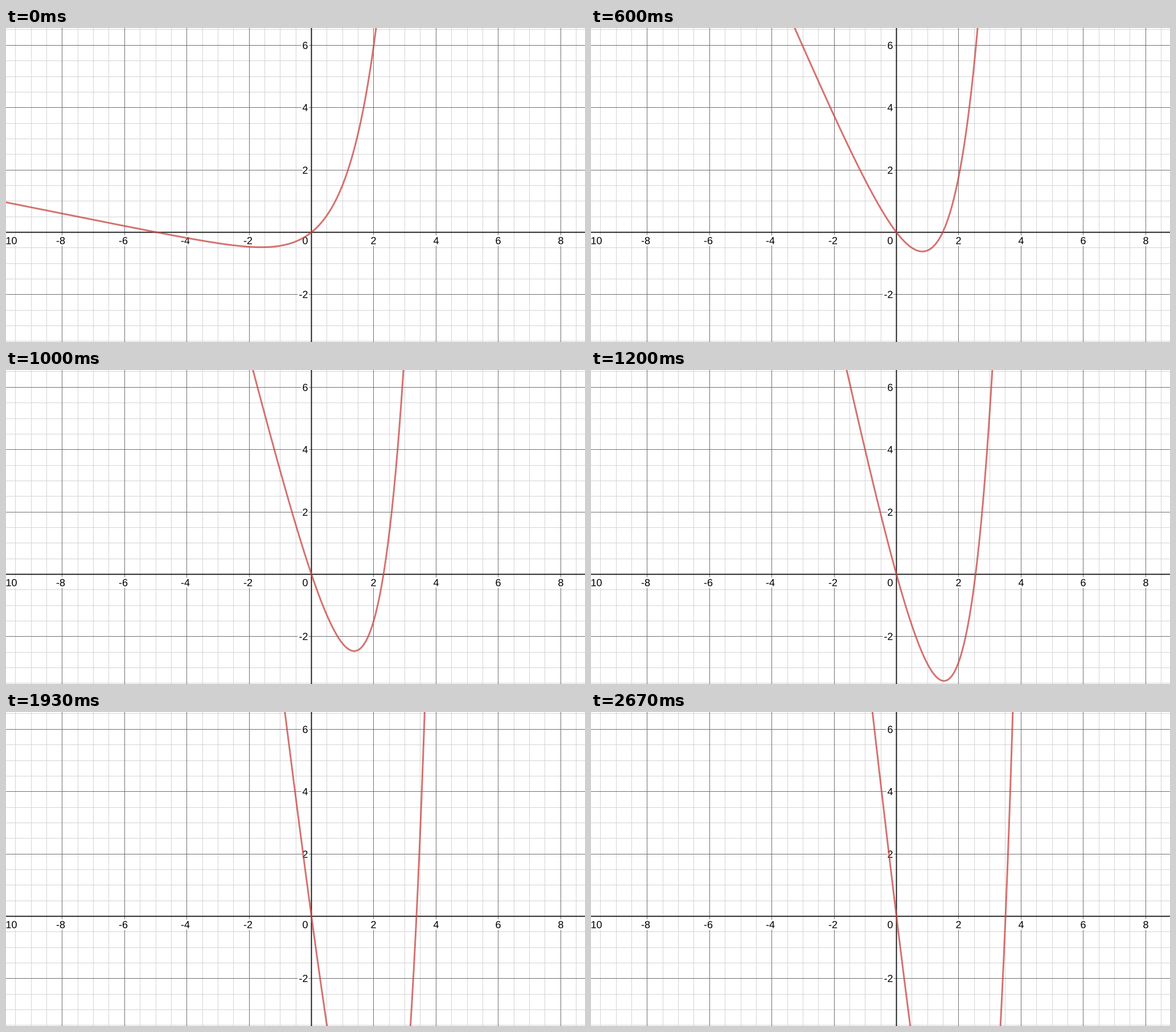
A matplotlib script that plays this animation: 1017x551 px, repeating every 2740 ms.

```python
import math

import numpy as np
import matplotlib.pyplot as plt
from matplotlib.animation import FuncAnimation
from matplotlib.collections import LineCollection
from matplotlib.patheffects import withStroke

W, H = 1017, 551
UNIT = 54.7                # pixels per graph unit
OX, OY = 536.5, 358.5      # graph origin in pixels
FRAMES, INTERVAL = 274, 10
TICK = 20 / 3              # frames per tick of a 15-per-second clock

plt.rcParams["font.family"] = "Liberation Sans"
plt.rcParams["text.hinting"] = "none"

# 72 dpi makes one point equal one pixel
fig = plt.figure(figsize=((W + 0.001) / 72, (H + 0.001) / 72), dpi=72,
                 facecolor="white")
ax = fig.add_axes([0, 0, 1, 1])
ax.set_xlim(0, W)
ax.set_ylim(H, 0)
ax.axis("off")


def px(x):
    return math.floor(OX + x * UNIT) + 0.5


def py(y):
    return math.floor(OY - y * UNIT) + 0.5


def grid(xs, ys, color, width, z):
    lines = [[(px(x), 0), (px(x), H)] for x in xs]
    lines += [[(0, py(y)), (W, py(y))] for y in ys]
    ax.add_collection(LineCollection(lines, colors=color, linewidths=width,
                                     zorder=z, snap=False))


def label(x, y, text, align):
    ax.text(x, y + 6.3, text, size=18, ha=align, va="baseline", color="black",
            zorder=4, path_effects=[withStroke(linewidth=6, foreground="white")])


# Half-unit minor lines, major lines every two units, then the axes
grid(np.arange(-9.5, 9, 0.5), np.arange(-3.5, 7, 0.5), "#d4d4d4", 1, 1)
grid(range(-8, 9, 2), range(-2, 7, 2), "#707070", 1, 2)
grid([0], [0], "#101010", 1.8, 5)

for x in range(-8, 9, 2):
    if x:
        label(px(x) - (2.5 if x < 0 else 0), 373, str(x), "center")
label(19.5, 373, "-10", "right")
label(525.5, 373, "0", "center")
for y in (-2, 2, 4, 6):
    label(530.5, py(y), str(y), "right")

# The slider is dragged in pushes and pauses: (tick, slope)
DRAG = [(5, 0.2), (9, 2.3), (13, 3.5), (18, 4.6), (21, 5.55), (22, 6.5),
        (26, 8.0), (28, 8.0), (29, 8.35), (32, 8.7), (35, 8.7),
        (36, 8.85), (38, 8.85), (40, 9.2)]

xs = np.linspace(-10, 4.2, 700)
curve, = ax.plot([], [], color="#c74440", alpha=0.75, lw=3, zorder=6,
                 solid_joinstyle="round")


def update(frame):
    tick = math.floor((frame + 0.5) / TICK)
    slope = np.interp(tick, *zip(*DRAG))
    ys = np.exp(xs) - 1 - slope * xs
    curve.set_data(OX + xs * UNIT, OY - ys * UNIT)
    return curve,


anim = FuncAnimation(fig, update, frames=FRAMES, interval=INTERVAL,
                     repeat=True, repeat_delay=0, blit=False)
plt.show()
```
